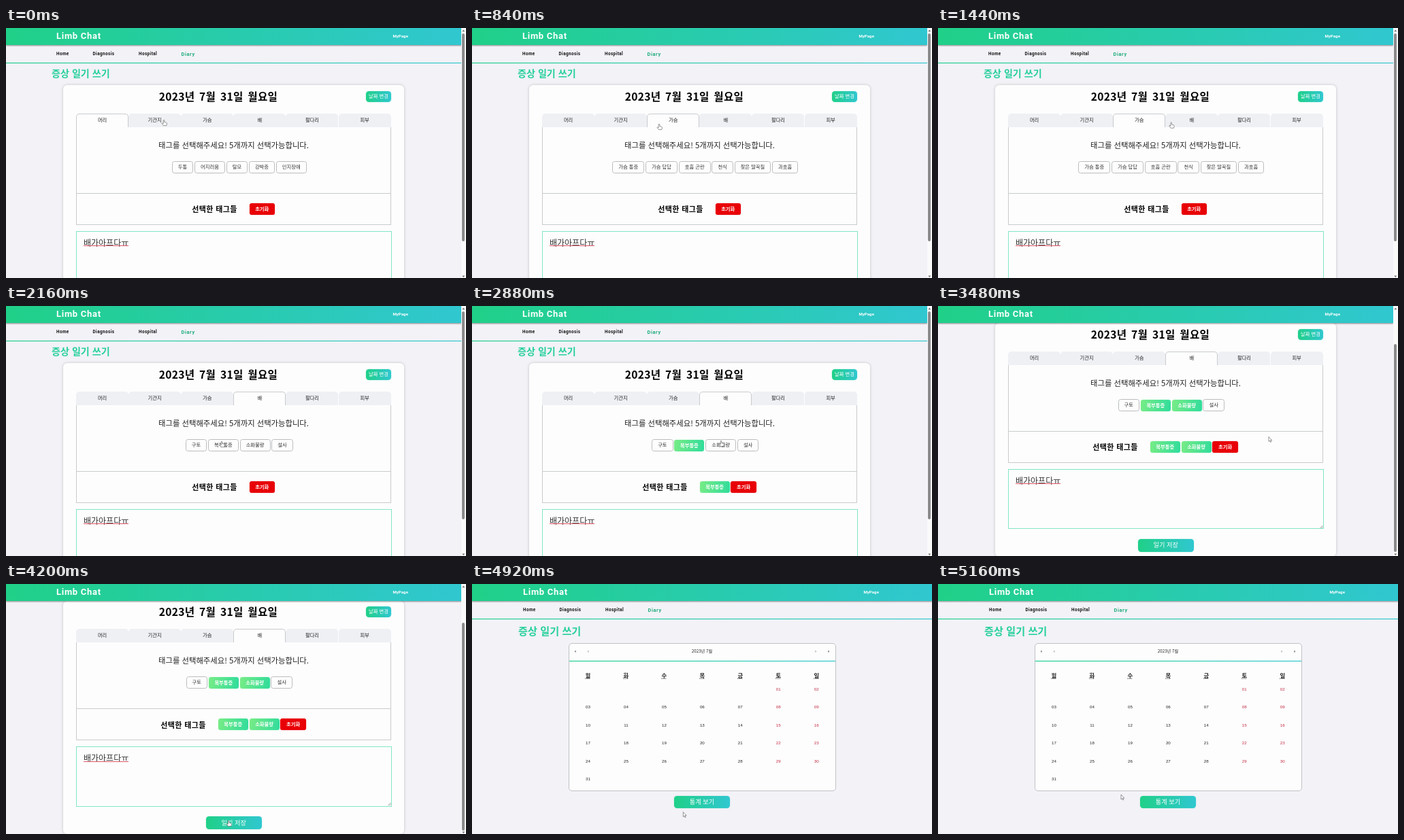
An HTML page for the animation above (5.28 s loop, 676 px wide and 368 px high).

```html
<!DOCTYPE html>
<html lang="ko">
<head>
<meta charset="utf-8">
<title>증상 일기</title>
<style>
  html, body { margin: 0; width: 100%; height: 100%; overflow: hidden; background: #f2f2f7; }
  body { font: 7.3px "Noto Sans CJK KR", "Noto Sans CJK", sans-serif; color: #222; }
  div { position: absolute; box-sizing: border-box; white-space: nowrap; }
  #stage { left: 0; top: 0; width: 676px; height: 368px; overflow: hidden; background: #f2f2f7; }
  .mid { transform: translate(-50%, calc(-50% - .06em)); line-height: 1.4; }
  .left { transform: translateY(calc(-50% - .06em)); line-height: 1.4; }
  .lat { font-family: Roboto, sans-serif; font-weight: 700; transform: translateY(-50%); line-height: 1.2; }
  .brand { font-size: 13px; letter-spacing: .7px; color: #fff; }
  .my { font-size: 6px; letter-spacing: .1px; color: #fff; }
  .menu { font-size: 6.3px; letter-spacing: .45px; color: #111; }
  .now { font-size: 7.4px; letter-spacing: .6px; color: #1fab7a; }
  .grad { background: linear-gradient(90deg, #20d088, #30c7d0); }
  .bar { box-shadow: 0 1px 2px rgba(0, 0, 0, .45); }
  .line { box-shadow: 0 0 1px #2bcbb0; }
  .title { font-size: 14.1px; font-weight: 700; color: #27d09c; }
  .card { background: #fdfdfd; border-radius: 6px; box-shadow: 0 0 4px rgba(0, 0, 0, .2); }
  .date { font-size: 15.6px; font-weight: 700; letter-spacing: .3px; word-spacing: 2px; color: #000; }
  .btn { border-radius: 4.5px; box-shadow: 0 0 1px #2bcbb0; }
  .white { color: #fff; }
  .big { font-size: 9.2px; }
  .ask { font-size: 11.35px; }
  .box { border: 1px solid #c9cbce; border-top: 0; }
  .tab { background: #eef0f4; border-radius: 5px 5px 0 0; border: 1px solid transparent; border-bottom: 0; }
  .tab.on { background: #fdfdfd; border-color: #c9cbce; }
  .row { display: flex; align-items: center; justify-content: center; gap: 1.8px; }
  .row div { position: static; }
  .tag { height: 18px; padding: 0 8px 1px; border: 1px solid #bbbdc0; border-radius: 3.5px; line-height: 15px; color: #333; }
  .tag.on, .tag.reset { height: 17px; padding: 0 7.6px 1px; border-color: transparent; color: #fff; font-weight: 700; }
  .tag.on { background: linear-gradient(100deg, #78ec86, #30dc9c) border-box; box-shadow: 0 0 1px #55e491; }
  .tag.reset { background: #e80006 border-box; box-shadow: 0 0 1px #e80006; }
  .label { font-size: 11px; font-weight: 700; letter-spacing: .4px; margin-right: 16px; color: #000; }
  .area { border: 1px solid #83e5c6; background: #fdfdfd; }
  .memo { font-size: 12px; font-weight: 300; color: #333; }
  .cal { background: #fdfdfd; border: 1px solid #c0c2c5; border-radius: 5px; }
  .small { font-size: 6.2px; }
  .day { font-family: "Liberation Sans", Arial, sans-serif; font-size: 6.2px; transform: translate(-50%, -50%); }
  .week { font-size: 8.4px; font-weight: 700; text-decoration: underline dotted 1px; text-underline-offset: 1px; }
  .off { color: #c22840; }
  svg { position: absolute; left: 0; top: 0; overflow: visible; }
</style>
</head>
<body>
<div id="stage"></div>
<script>
const LOOP = 5280, STEP = 120, LEAVE = 4800;
const stage = document.getElementById('stage');

function add(parent, cls, text = '') {
  const e = document.createElement('div');
  e.className = cls;
  e.textContent = text;
  parent.appendChild(e);
  return e;
}
function rect(parent, cls, x, y, w, h) {
  const e = add(parent, cls);
  Object.assign(e.style, { left: x + 'px', top: y + 'px', width: w + 'px', height: h + 'px' });
  return e;
}
function label(parent, cls, x, y, text) {
  const e = add(parent, cls, text);
  e.style.left = x + 'px';
  e.style.top = y + 'px';
  return e;
}
function button(parent, x, y, w, h, text, cls = '') {
  rect(parent, 'btn grad', x, y, w, h);
  label(parent, 'mid white ' + cls, x + w / 2, y + h / 2, text);
}
function menu(parent, dx) {
  [['Home', 74], ['Diagnosis', 127.5], ['Hospital', 195]].forEach(([s, x]) =>
    label(parent, 'lat menu', x + dx, 39.2, s));
  label(parent, 'lat now', 257.5 + dx, 39, 'Diary');
  rect(parent, 'grad line', 0, 51, 676, 1);
}

// Diary form
const form = rect(stage, '', 0, 0, 669, 430);
menu(form, 0);
label(form, 'left title', 67, 68.1, '증상 일기 쓰기');
rect(form, 'card', 84, 84.4, 501, 343.6);
label(form, 'mid date', 312, 102, '2023년 7월 31일 월요일');
button(form, 529, 92.6, 37, 16.2, '날짜 변경');
rect(form, 'box', 103, 145, 463, 145);
rect(form, '', 103, 243, 463, 1).style.background = '#c9cbce';

const tabs = ['머리', '기관지', '가슴', '배', '팔다리', '피부'].map((name, i) => {
  const x = 103 + i * 77.1;
  const tab = rect(form, 'tab', x, 126, 77.1, 19.5);
  label(form, 'mid', x + 38.6, 136, name);
  return tab;
});
label(form, 'mid ask', 334.5, 174, '태그를 선택해주세요! 5개까지 선택가능합니다.');
const tagRow = rect(form, 'row', 103, 195, 479.5, 20);
const pickRow = rect(form, 'row', 103, 256.4, 462, 20);
rect(form, 'area', 102.5, 299, 464.5, 88.4);
label(form, 'left memo', 114, 316.9, '배가아프다ㅠ');
rect(form, '', 114, 320.4, 66, 1).style.background = '#e0596a';
button(form, 294, 402, 81.5, 18.7, '일기 저장', 'big');
form.insertAdjacentHTML('beforeend',
  '<svg width="1" height="1"><path d="M561.5 386l4-4m-1.8 4l1.8-1.8" stroke="#777" stroke-width=".7"/></svg>');

// Calendar
const month = rect(stage, '', 0, 0, 676, 368);
menu(month, 1);
label(month, 'left title', 68, 70, '증상 일기 쓰기').style.fontSize = '15.2px';
rect(month, 'cal', 142, 86.5, 392.5, 218);
rect(month, 'grad line', 142.5, 112.6, 391.5, 1);
[['«', 152], ['‹', 171], ['2023년 7월', 338], ['›', 505], ['»', 524]].forEach(([s, x]) =>
  label(month, 'mid small', x, 100.3, s));
[...'월화수목금토일'].forEach((s, i) => label(month, 'mid week', 170.3 + i * 56, 134.5, s));
for (let d = 1; d <= 31; d++) {
  const cell = d + 4, col = cell % 7;
  label(month, 'day' + (col > 4 ? ' off' : ''), 170.5 + col * 55.95,
    153.5 + Math.floor(cell / 7) * 26.5, String(d).padStart(2, '0'));
}
button(month, 297, 311.5, 82, 18.7, '통계 보기', 'big');

// Fixed header and scrollbar
const bar = rect(stage, 'grad bar', 0, 0, 669, 24.6);
const brand = label(bar, 'lat brand', 74, 12.1, 'Limb Chat');
const my = label(bar, 'lat my', 568.4, 12.2, 'MyPage');
const track = rect(stage, '', 669, 0, 7, 368);
track.style.background = '#fafafb';
const thumb = rect(track, '', 1.3, 8, 4, 305.5);
thumb.style.cssText += 'background:#8a8a8c;border-radius:2px';
track.insertAdjacentHTML('beforeend',
  '<svg width="7" height="368"><path d="M1.3 5.2L3.3 2.6 5.3 5.2ZM1.3 364.6H5.3L3.3 367.2Z" fill="#777"/></svg>');

stage.insertAdjacentHTML('beforeend', `<svg width="676" height="368"><g id="pointer"
  fill="#fff" stroke="#444" stroke-width=".55" stroke-linejoin="round">
  <path d="M-.8.8Q0-.4.8.8V3.5L3.6 4.2Q4.6 4.6 4.4 6L3.8 8.6H-.6L-3 5.4Q-2.6 4.4-1.6 5L-.8 5.8Z"/>
  <path d="M0 0V7L1.6 5.5 2.7 8 3.8 7.5 2.7 5.1H4.8Z"/></g></svg>`);
const pointer = document.getElementById('pointer');
const [hand, arrow] = pointer.children;

const TAGS = {
  0: ['두통', '어지러움', '탈모', '강박증', '인지장애'],
  2: ['가슴 통증', '가슴 답답', '호흡 곤란', '천식', '잦은 딸꾹질', '과호흡'],
  3: ['구토', '복부통증', '소화불량', '설사']
};
const OPEN = [[0, 0], [600, 2], [1560, 3]];
const PICKS = [[2400, '복부통증'], [3000, '소화불량']];
const SCROLL = [[3120, 0], [3240, 24], [3360, 51], [3480, 59], [3600, 59.8]];
const PATH = [
  [0, 232, 135], [600, 266, 140], [840, 275, 141], [1200, 292, 140],
  [1560, 368, 138], [1680, 368, 138], [2160, 317, 199], [2400, 317, 199],
  [2880, 366, 198], [3000, 366, 198], [3360, 486, 192.5], [3600, 486, 192.5],
  [4200, 327, 348], [4320, 330, 348], [4440, 331, 348.5], [4800, 331, 348.5],
  [5160, 269, 310]
];
const ARROW = [[1800, 2040], [3120, 4080], [4800, 5280]];

function at(keys, t, n = 1) {
  const i = keys.findIndex(k => k[0] > t);
  if (i === 0) return keys[0][n];
  if (i < 0) return keys[keys.length - 1][n];
  const a = keys[i - 1], b = keys[i];
  return a[n] + (b[n] - a[n]) * (t - a[0]) / (b[0] - a[0]);
}

let shown = '';
function fill(open, picked) {
  const key = open + picked.join();
  if (key === shown) return;
  shown = key;
  tabs.forEach((tab, i) => tab.classList.toggle('on', i === open));
  tagRow.textContent = pickRow.textContent = '';
  TAGS[open].forEach(s => add(tagRow, picked.includes(s) ? 'tag on' : 'tag', s));
  add(pickRow, 'label', '선택한 태그들');
  picked.forEach(s => add(pickRow, 'tag on', s));
  add(pickRow, 'tag reset', '초기화');
}

function draw(ms) {
  const t = Math.floor(ms % LOOP / STEP) * STEP;
  const left = t >= LEAVE, y = at(SCROLL, t);
  fill(OPEN.filter(k => k[0] <= t).pop()[1], PICKS.filter(k => k[0] <= t).map(k => k[1]));
  form.style.display = track.style.display = left ? 'none' : '';
  month.style.display = left ? '' : 'none';
  form.style.top = -y + 'px';
  thumb.style.top = 8 + y * .82 + 'px';
  bar.style.width = (left ? 676 : 669) + 'px';
  brand.style.left = (left ? 75 : 74) + 'px';
  my.style.left = (left ? 575.4 : 568.4) + 'px';
  const isArrow = ARROW.some(([a, b]) => t >= a && t < b);
  hand.style.display = isArrow ? 'none' : '';
  arrow.style.display = isArrow ? '' : 'none';
  pointer.setAttribute('transform', `translate(${at(PATH, t)} ${at(PATH, t, 2)})`);
}

const start = performance.now();
function tick() {
  draw(performance.now() - start);
  requestAnimationFrame(tick);
}
tick();
</script>
</body>
</html>
```
